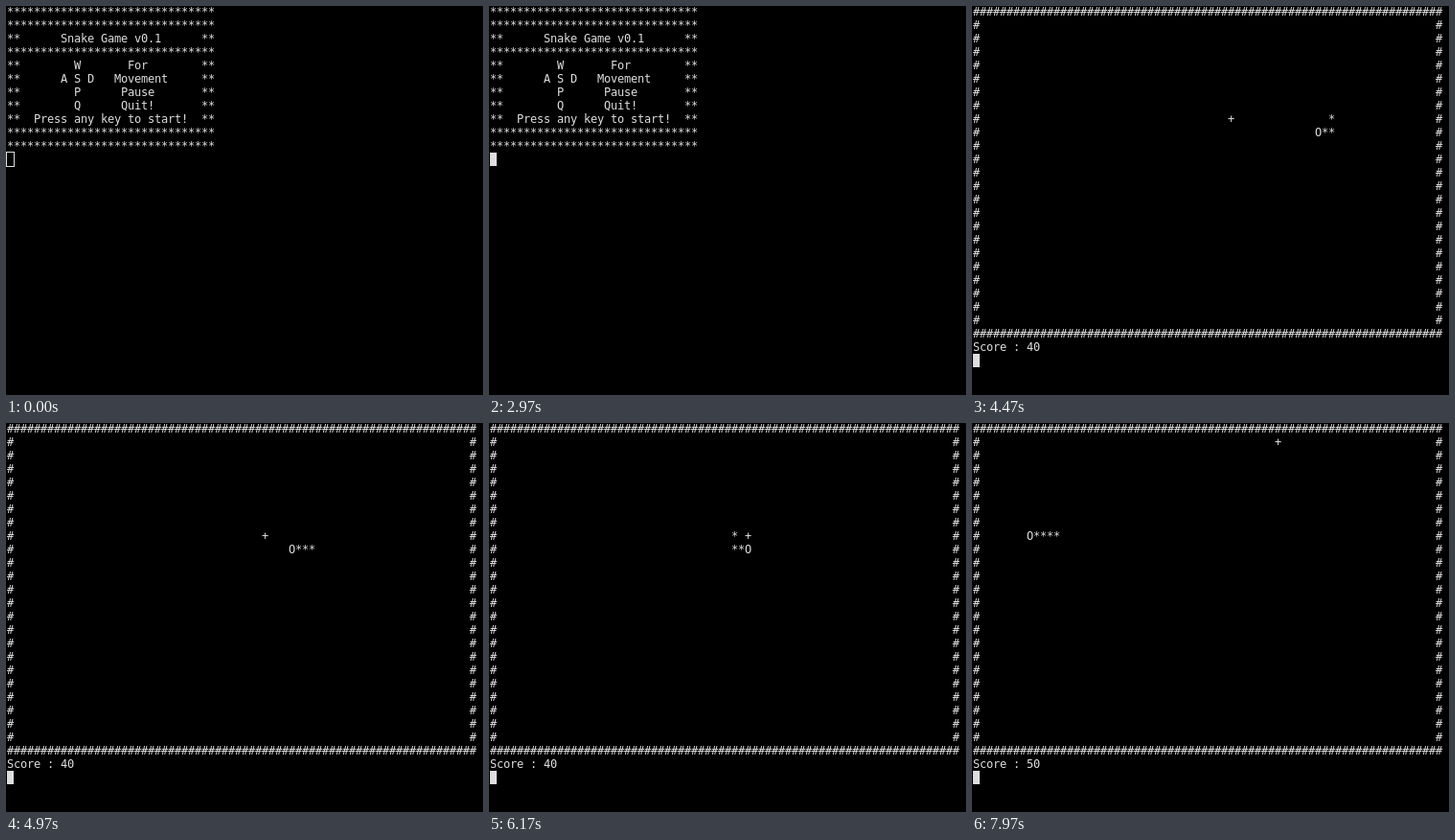
An HTML page with a canvas for the animation above (8 s loop, 498 by 406 pixels).

```html
<!DOCTYPE html>
<html lang="en">
<head>
<meta charset="utf-8">
<title>Snake Game v0.1</title>
<style>
  html, body { margin: 0; width: 100%; height: 100%; overflow: hidden; background: #000; }
  canvas { display: block; }
</style>
</head>
<body>
<canvas id="stage" width="498" height="406"></canvas>
<script>
const LOOP = 8000, GAME_START = 3170, FOCUS = 630;
const CELL_W = 7, CELL_H = 14, COLS = 70, ROWS = 25;
const INK = '#dedede';
const ctx = document.getElementById('stage').getContext('2d', { alpha: false });

// Snake route: start cell, then runs of moves.
const STEP = { L: [-1, 0], R: [1, 0], U: [0, -1], D: [0, 1] };
const TAIL = 3, EAT = 57;
const route = [[71, 3]];
for (const [, dir, n] of 'L18 D6 L14 U8 L3 D8 R2 U1 L30'.matchAll(/([LRUD])(\d+)/g)) {
  for (let i = 0; i < n; i++) {
    const [x, y] = route[route.length - 1];
    route.push([x + STEP[dir][0], y + STEP[dir][1]]);
  }
}

// Bursts of steady movement: start time, first move, end time, last move.
const bursts = [
  [3170, 0, 3700, 7], [3700, 7, 3900, 11], [4070, 15, 4470, 23],
  [4570, 24, 4870, 30], [4900, 31, 5470, 41], [5500, 42, 5700, 45],
  [5730, 46, 6030, 52], [6170, 56, 6970, 68], [7030, 69, 7770, 84],
  [7870, 85, 7970, 87]
];

const cursorOff = [
  [1200, 1770], [2370, 2970], [3770, 4120],
  [5020, 5200], [5980, 6030], [6940, 7570]
];

function print(col, row, text) {
  [...text].forEach((ch, i) => {
    if (ch !== ' ') ctx.fillText(ch, 1 + (col + i) * CELL_W, row * CELL_H + 10);
  });
}

function cursor(row, t) {
  const y = row * CELL_H - 1;
  if (t < FOCUS) ctx.strokeRect(0.5, y - 0.5, CELL_W + 1, CELL_H + 1);
  else if (!cursorOff.some(([from, to]) => t >= from && t < to)) ctx.fillRect(1, y, CELL_W, CELL_H);
}

function drawMenu(t) {
  for (let row = 0; row < 11; row++) {
    if ([0, 1, 3, 9, 10].includes(row)) print(0, row, '*'.repeat(31));
    else { print(0, row, '**'); print(29, row, '**'); }
  }
  print(8, 2, 'Snake Game v0.1');
  print(10, 4, 'W'); print(18, 4, 'For');
  print(8, 5, 'A S D'); print(16, 5, 'Movement');
  print(10, 6, 'P'); print(17, 6, 'Pause');
  print(10, 7, 'Q'); print(17, 7, 'Quit!');
  print(4, 8, 'Press any key to start!');
  cursor(11, t);
}

function moveAt(t) {
  const [t0, m0, t1, m1] = bursts.filter(b => t >= b[0]).pop();
  const p = Math.min(1, (t - t0) / (t1 - t0));
  return Math.floor(m0 + (m1 - m0) * p + 1e-6);
}

function drawGame(t) {
  for (let row = 0; row < ROWS; row++) {
    if (row % (ROWS - 1) === 0) print(0, row, '#'.repeat(COLS));
    else { print(0, row, '#'); print(COLS - 1, row, '#'); }
  }
  const move = moveAt(t), fed = move >= EAT;
  if (fed) print(45, 1, '+'); else print(38, 8, '+');

  const head = move + TAIL, length = fed ? 5 : 4;
  for (let i = 0; i < length; i++) {
    const [x, y] = route[head - i];
    if (x < COLS - 1) print(x, y, i ? '*' : 'O');
  }
  print(0, ROWS, 'Score : ' + length * 10);
  cursor(ROWS + 1, t);
}

function frame() {
  const t = performance.now() % LOOP;
  ctx.fillStyle = '#000';
  ctx.fillRect(0, 0, 498, 406);
  ctx.fillStyle = ctx.strokeStyle = INK;
  ctx.font = '12px "DejaVu Sans Mono", monospace';
  (t < GAME_START ? drawMenu : drawGame)(t);
  requestAnimationFrame(frame);
}
frame();
</script>
</body>
</html>
```
